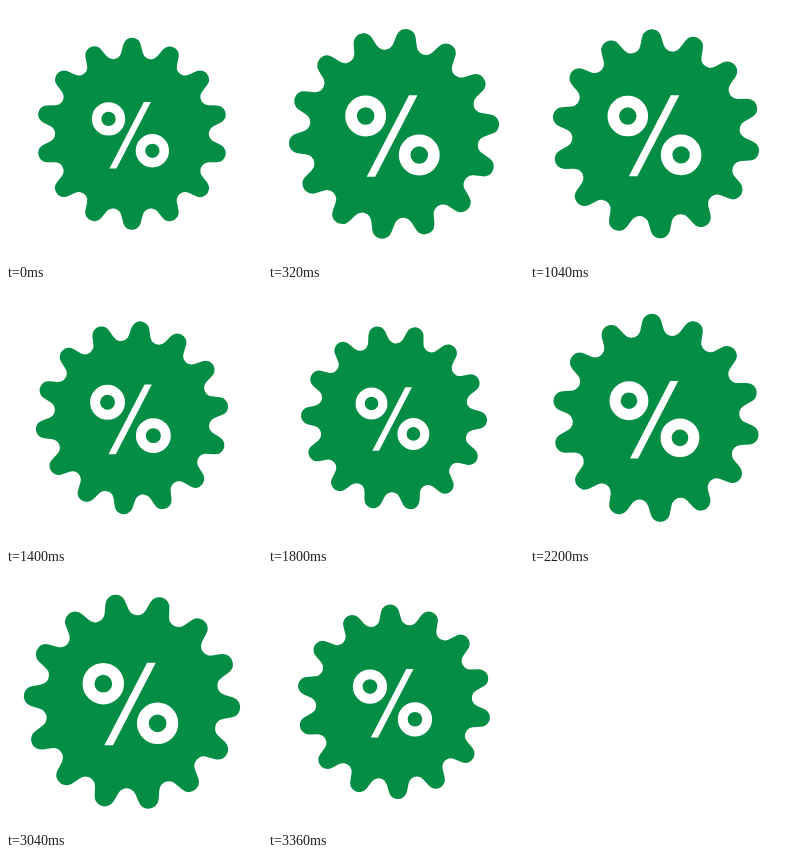
These frames come from a looping animation (256 px wide and 256 px high, 3.4 s). An HTML page with a canvas:

```html
<!DOCTYPE html>
<html lang="en">
<head>
<meta charset="utf-8">
<title>Percent badge</title>
<style>
  html, body { margin: 0; width: 100%; height: 100%; overflow: hidden; background: #fff; }
  canvas { display: block; width: 256px; height: 256px; }
</style>
</head>
<body>
<canvas id="stage" width="256" height="256"></canvas>
<script>
const ctx = document.getElementById('stage').getContext('2d');
const GREEN = '#048d44';
const LOOP = 3400, STEP = 40, LOBES = 14;
const SPIN = 22.2 * Math.PI / 180 / 1000; // radians per ms
const TIP = 0.094, DIP = 0.088, VALLEY = 0.8; // relative to the badge radius

// [time, badge radius, percent sign width]
const KEYS = [
  [0, 96, 77.5],
  [605, 114.1, 110.3],
  [1700, 90.3, 70],
  [2735, 118.9, 111.8],
  [3400, 96, 77.5]
];

function sample(t, col) {
  let i = 1;
  while (i < KEYS.length - 1 && t > KEYS[i][0]) i++;
  const a = KEYS[i - 1], b = KEYS[i];
  return a[col] + (b[col] - a[col]) * (t - a[0]) / (b[0] - a[0]);
}

// Round tips and round valleys, joined by their common tangents.
function badgePath() {
  const path = new Path2D();
  const half = Math.PI / LOBES;
  const tipAt = 1 - TIP, dipAt = VALLEY + DIP;
  const dx = dipAt * Math.cos(half) - tipAt;
  const dy = dipAt * Math.sin(half);
  const turn = Math.atan2(dy, dx) - Math.acos((TIP + DIP) / Math.hypot(dx, dy));
  for (let i = 0; i < LOBES; i++) {
    const a = 2 * half * i, b = a + half;
    path.arc(tipAt * Math.cos(a), tipAt * Math.sin(a), TIP, a - turn, a + turn);
    path.arc(dipAt * Math.cos(b), dipAt * Math.sin(b), DIP,
      a + turn + Math.PI, a + 2 * half - turn + Math.PI, true);
  }
  path.closePath();
  return path;
}
const BADGE = badgePath();

function drawBadge(radius, angle) {
  ctx.save();
  ctx.translate(126, 127.8);
  ctx.rotate(angle - Math.PI / 2);
  ctx.scale(radius, radius);
  ctx.fillStyle = GREEN;
  ctx.fill(BADGE);
  ctx.restore();
}

function ring(x, y) {
  ctx.beginPath();
  ctx.arc(x, y, 12, 0, 2 * Math.PI);
  ctx.stroke();
}

function drawPercent(width) {
  const s = width / 78;
  ctx.save();
  ctx.translate(124.4, 126 + 3.2 * s);
  ctx.scale(s, s);
  ctx.strokeStyle = ctx.fillStyle = '#fff';
  ctx.lineWidth = 9.6;
  ring(-22, -16.4);
  ring(22.1, 15.7);
  ctx.beginPath();
  ctx.moveTo(13.6, -33.5);
  ctx.lineTo(20.6, -33.5);
  ctx.lineTo(-14.1, 33.5);
  ctx.lineTo(-21.1, 33.5);
  ctx.closePath();
  ctx.fill();
  ctx.restore();
}

function draw(t) {
  ctx.fillStyle = '#fff';
  ctx.fillRect(0, 0, 256, 256);
  drawBadge(sample(t, 1), t * SPIN);
  drawPercent(sample(t, 2));
}

const start = performance.now();
function tick() {
  const t = (performance.now() - start) % LOOP;
  draw(Math.floor(t / STEP) * STEP);
  requestAnimationFrame(tick);
}
tick();
</script>
</body>
</html>
```
